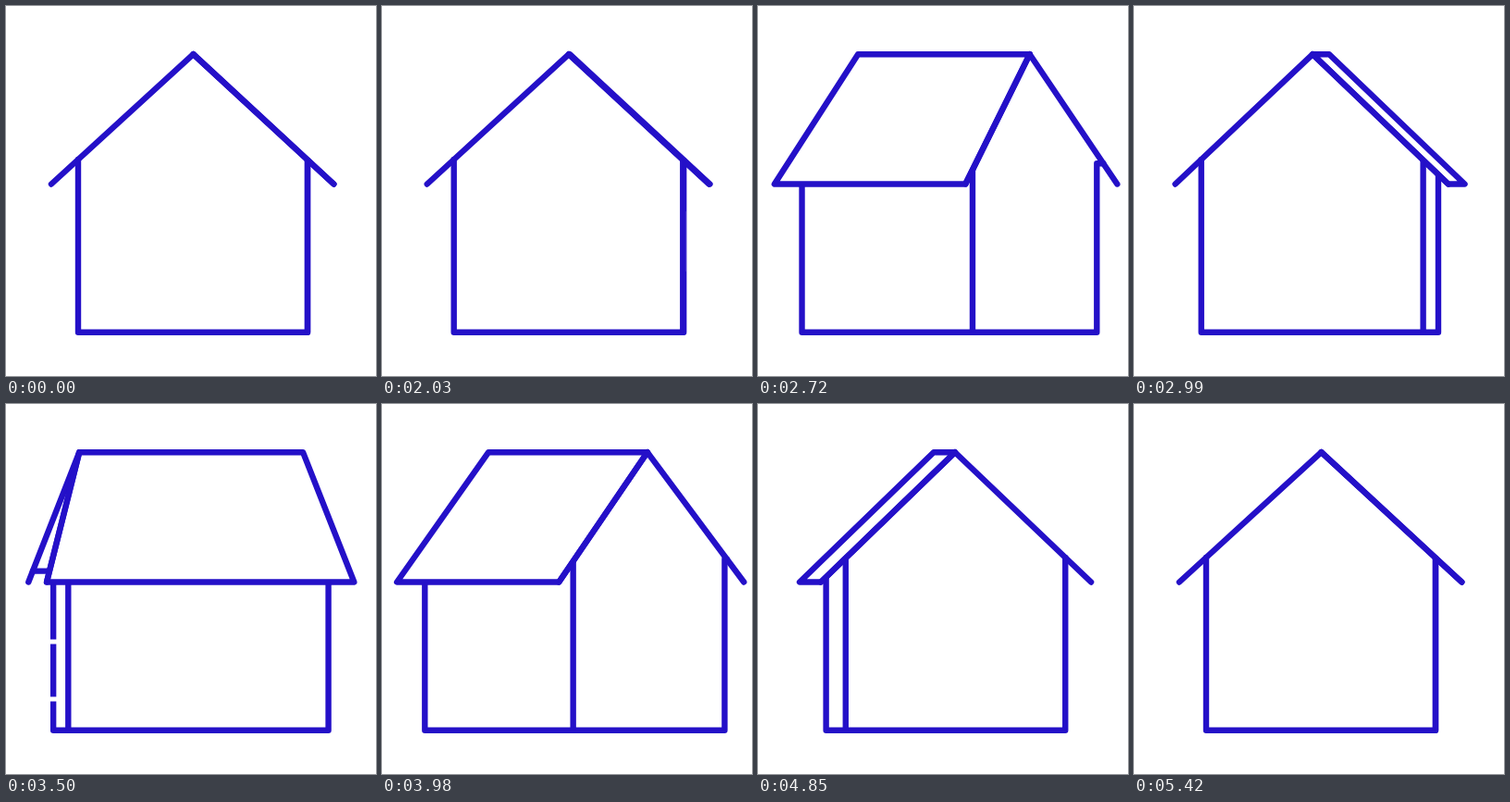
Write an HTML page with a canvas that moves like this. It is 400x400 px and loops after 5450 ms.

```html
<!DOCTYPE html>
<html lang="en">
<head>
<meta charset="utf-8">
<title>Turning house</title>
<style>
html, body { margin: 0; width: 100%; height: 100%; overflow: hidden; background: #fff; }
canvas { display: block; }
</style>
</head>
<body>
<canvas id="stage" width="400" height="400"></canvas>
<script>
const ctx = document.getElementById('stage').getContext('2d');
const BLUE = '#2410c8', WHITE = '#fff';
const LOOP = 5450, REST = 2000, SPIN = 3420, STEP = 30;
const RIDGE = 52.2, EAVE = 192.5, BASE = 352.7, WALL = 167;

// Horizontal positions around the centre for three views of the house:
// centre, ridge front/back, far eave, near eave front/back,
// wall far/near/back, top of the far wall
const VIEWS = [
  [202, 0.5, 0.5, -153, 152.3, 152.3, -124, 124, 124, 166],
  [200, -85, 83, -192, 17.4, 184.3, -171.5, 0, 154, 167],
  [200.5, -125, 124.5, -174.5, -174.5, 175, -147, -147, 147.5, 182]
];

// Cubic easing (0.19, 0, 0.23, 1), solved by bisection
function ease(x) {
  let lo = 0, hi = 1;
  for (let i = 0; i < 30; i++) {
    const s = (lo + hi) / 2, r = 1 - s;
    if (0.57 * s * r * r + 0.69 * s * s * r + s * s * s < x) lo = s; else hi = s;
  }
  return x >= 1 ? 1 : lo * lo * (3 - 2 * lo);
}

function line(points, color = BLUE, width = 6.4, fill = false) {
  ctx.beginPath();
  points.forEach(([x, y]) => ctx.lineTo(x, y));
  if (fill) {
    ctx.closePath();
    ctx.fillStyle = WHITE;
    ctx.fill();
  }
  ctx.strokeStyle = color;
  ctx.lineWidth = width;
  ctx.stroke();
}

// turn counts eighths of a full rotation; the back looks like the front
function drawHouse(turn) {
  const half = turn % 4;
  const mirrored = half > 2;
  const pos = mirrored ? 4 - half : half;
  const i = Math.min(1, Math.floor(pos)), mix = pos - i;
  const [centre, ridgeF, ridgeB, far, nearF, nearB, wallFar, wallNear, wallBack, farTop] =
    VIEWS[i].map((v, n) => v + (VIEWS[i + 1][n] - v) * mix);

  ctx.setTransform(1, 0, 0, 1, 0, 0);
  ctx.fillStyle = WHITE;
  ctx.fillRect(0, 0, 400, 400);
  ctx.setTransform(mirrored ? -1 : 1, 0, 0, 1, centre, 0);
  ctx.lineCap = ctx.lineJoin = 'round';

  // The far wall meets the slope of the gable at its top
  const slopeX = ridgeF + (far - ridgeF) * (farTop - RIDGE) / (EAVE - RIDGE);
  line([[slopeX, farTop], [wallFar, farTop], [wallFar, BASE], [wallBack, BASE], [wallBack, WALL]]);

  // White details that cut into the walls
  const mid = (wallNear + wallBack) / 2;
  ctx.lineCap = 'butt';
  line([[mid, 222], [mid, 287]], WHITE, 5);
  if (pos > 1.7) {
    for (const y of [257, 319]) line([[wallFar - 4, y], [wallFar + 4, y]], WHITE, 5);
  }
  ctx.lineCap = 'round';

  line([[wallNear, WALL], [wallNear, BASE]]);
  line([[far, EAVE], [ridgeF, RIDGE]]);
  line([[ridgeF, RIDGE], [ridgeB, RIDGE], [nearB, EAVE], [nearF, EAVE]], BLUE, 6.4, true);
  line([[nearF, EAVE], [ridgeF, RIDGE]]);
}

const start = performance.now();
function frame() {
  const t = (performance.now() - start) % LOOP;
  const spin = Math.max(0, Math.floor((t - REST) / STEP) * STEP);
  drawHouse(8 * ease(spin / SPIN));
  requestAnimationFrame(frame);
}
frame();
</script>
</body>
</html>
```
